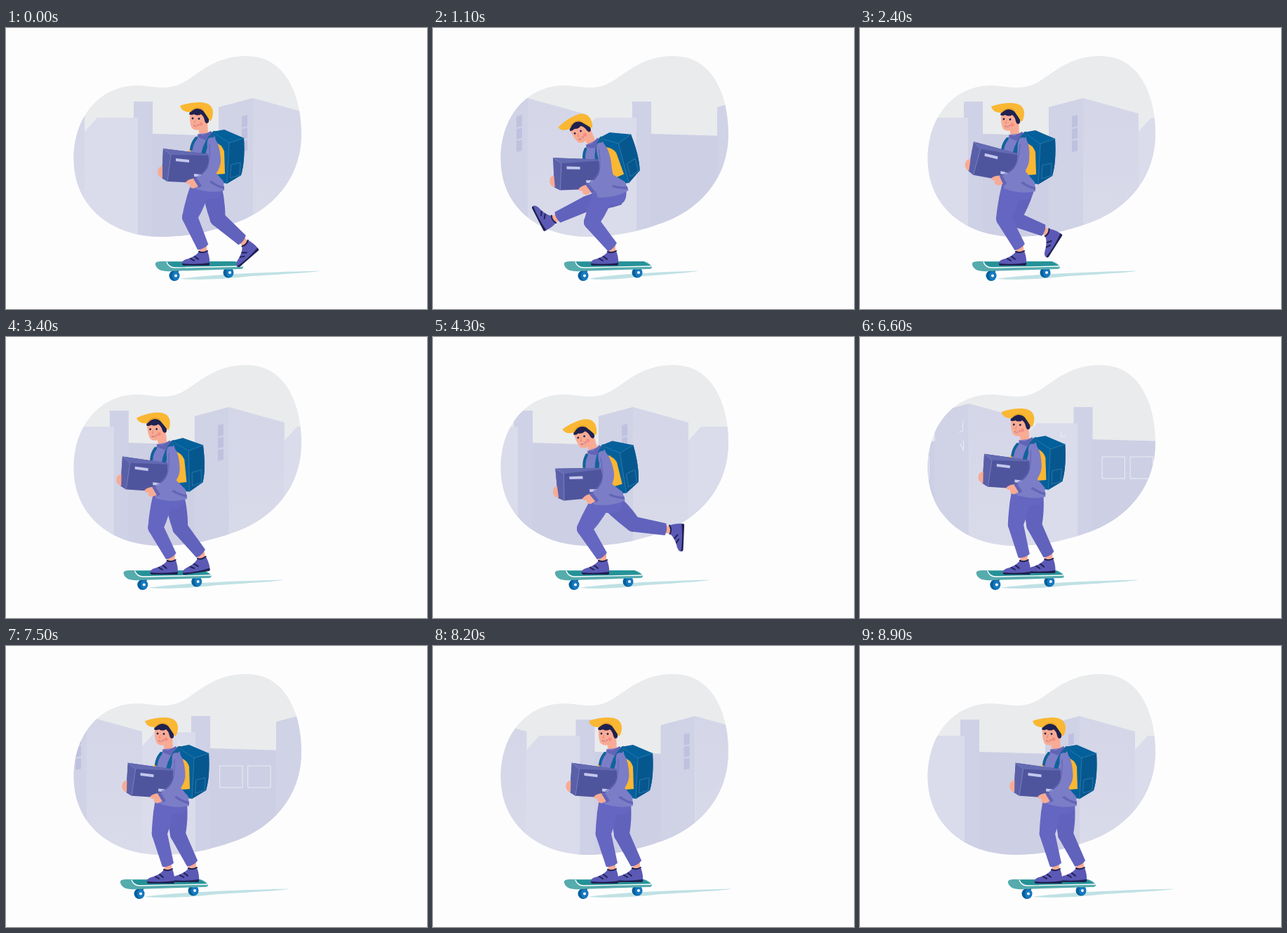
Animation, 600 px wide and 401 px high, one loop 9000 ms. Source, as an HTML page without scripts:

```html
<!DOCTYPE html>
<html lang="en">
<head>
<meta charset="utf-8">
<title>Skating courier</title>
<style>
html, body { margin: 0; width: 100%; height: 100%; overflow: hidden; background: #fefdfe; }
svg { display: block; width: 600px; height: 401px; animation: ride 9s infinite; }

/* scroll, board, shadow, hips, torso, arms, front leg, back leg */
@property --scroll { syntax: "<length>"; inherits: true; initial-value: 0px; }
@property --board { syntax: "<length>"; inherits: true; initial-value: 0px; }
@property --shade { syntax: "<number>"; inherits: true; initial-value: 1; }
@property --hx { syntax: "<length>"; inherits: true; initial-value: 0px; }
@property --hy { syntax: "<length>"; inherits: true; initial-value: 0px; }
@property --lean { syntax: "<angle>"; inherits: true; initial-value: 0deg; }
@property --arms { syntax: "<angle>"; inherits: true; initial-value: 0deg; }
@property --f1 { syntax: "<angle>"; inherits: true; initial-value: 0deg; }
@property --f2 { syntax: "<angle>"; inherits: true; initial-value: 0deg; }
@property --b1 { syntax: "<angle>"; inherits: true; initial-value: 0deg; }
@property --b2 { syntax: "<angle>"; inherits: true; initial-value: 0deg; }
@property --b3 { syntax: "<angle>"; inherits: true; initial-value: 0deg; }

@keyframes ride {
  0% { animation-timing-function: steps(11);
    --scroll: 0px; --board: 0px; --shade: 1; --hx: 0px; --hy: 0px; --lean: 0deg; --arms: 0deg;
    --f1: 18deg; --f2: -41.7deg; --b1: -11.8deg; --b2: -37.1deg; --b3: 8deg; }
  12.222% { animation-timing-function: steps(6);
    --scroll: 421px; --board: -26px; --shade: .78; --hx: -33px; --hy: 8px; --lean: -18deg; --arms: 13deg;
    --f1: 22.4deg; --f2: -62deg; --b1: 74deg; --b2: -9deg; --b3: -2deg; }
  18.888% { animation-timing-function: steps(3);
    --scroll: 653px; --board: -38px; --shade: .88; --hx: -44px; --hy: 16px; --lean: -14deg; --arms: 10deg;
    --f1: 34.7deg; --f2: -80.9deg; --b1: 5deg; --b2: -5deg; --b3: -20deg; }
  22.222% { animation-timing-function: steps(4);
    --scroll: 769px; --board: -45px; --shade: .93; --hx: -54px; --hy: 8px; --lean: -8deg; --arms: 9deg;
    --f1: 22.4deg; --f2: -62deg; --b1: -30deg; --b2: -8deg; --b3: -5deg; }
  26.666% { animation-timing-function: steps(9);
    --scroll: 923px; --board: -53px; --shade: 1; --hx: -61px; --hy: 1px; --lean: 0deg; --arms: 8deg;
    --f1: 12.4deg; --f2: -41.7deg; --b1: 19deg; --b2: -87.5deg; --b3: 11deg; }
  36.666% { animation-timing-function: steps(10);
    --scroll: 1210px; --board: -46px; --shade: .97; --hx: -55px; --hy: 0px; --lean: -3deg; --arms: 5deg;
    --f1: 9.4deg; --f2: -37deg; --b1: -8deg; --b2: -26.5deg; --b3: 34.5deg; }
  47.777% { animation-timing-function: steps(7);
    --scroll: 1528px; --board: -39px; --shade: .93; --hx: -38px; --hy: 7px; --lean: -12deg; --arms: 4deg;
    --f1: 30deg; --f2: -62.4deg; --b1: -46.5deg; --b2: -34deg; --b3: -7deg; }
  55.555% { animation-timing-function: steps(6);
    --scroll: 1807px; --board: -42px; --shade: .925; --hx: -42px; --hy: 0px; --lean: -3deg; --arms: 2deg;
    --f1: 18deg; --f2: -41.7deg; --b1: 5deg; --b2: -40.5deg; --b3: 35.5deg; }
  62.222% { animation-timing-function: steps(19);
    --scroll: 2046px; --board: -44px; --shade: .925; --hx: -43px; --hy: -4px; --lean: 0deg; --arms: 1deg;
    --f1: 9.3deg; --f2: -23.8deg; --b1: -2.7deg; --b2: -23.8deg; --b3: 26.5deg; }
  83.333% { animation-timing-function: steps(14);
    --scroll: 2634px; --board: -50px; --shade: 1.03; --hx: -50px; --hy: -4px; --lean: 0deg; --arms: 1deg;
    --f1: 8.6deg; --f2: -23.8deg; --b1: -2.7deg; --b2: -23.8deg; --b3: 26.5deg; }
  98.888% { animation-timing-function: steps(1);
    --scroll: 3151px; --board: -2px; --shade: 1.01; --hx: -2px; --hy: -4px; --lean: 0deg; --arms: 1deg;
    --f1: 8.6deg; --f2: -23.8deg; --b1: -2.7deg; --b2: -23.8deg; --b3: 26.5deg; }
  100% {
    --scroll: 3190px; --board: 0px; --shade: 1; --hx: 0px; --hy: 0px; --lean: 0deg; --arms: 0deg;
    --f1: 18deg; --f2: -41.7deg; --b1: -11.8deg; --b2: -37.1deg; --b3: 8deg; }
}

.city { transform: translateX(var(--scroll)); }
.ride { transform: translateX(var(--board)); }
.shade { transform: scaleX(var(--shade)); transform-origin: 247px 350px; }
.hips { transform: translate(var(--hx), var(--hy)); }
.torso { transform: rotate(var(--lean)); transform-origin: 285px 226px; }
.head { transform: rotate(calc(var(--lean) * .4)); transform-origin: 281px 150px; }
.arms { transform: rotate(var(--arms)); transform-origin: 300px 160px; }
.f1 { transform: rotate(var(--f1)); }
.f2 { transform: rotate(var(--f2)); }
.b1 { transform: rotate(var(--b1)); }
.b2 { transform: rotate(var(--b2)); }
.b3 { transform: rotate(var(--b3)); }

.skin { fill: #f8ab94; }
.dark { fill: #20214f; }
.coat { fill: #7b7dc7; }
.coat2 { fill: #6264b6; }
.blue { fill: #04609b; }
.sun { fill: #fab733; }
.line { fill: none; stroke-linecap: round; stroke-linejoin: round; }
</style>
</head>
<body>
<svg viewBox="0 0 600 401">
<defs>
  <path id="blob" d="M96.500 187C96.500 125 135 82 187 82C205 82 215 87 235 84C267 79 285 40 343 40C398 40 421 95 421 151C421 215 380 258 330 277C295 290 260 298 222 298C150 298 96.500 255 96.500 187Z"/>
  <clipPath id="view"><use href="#blob"/></clipPath>
  <linearGradient id="face" x2="0" y2="1">
    <stop stop-color="#d4d6e8"/><stop offset="1" stop-color="#d9dbea"/>
  </linearGradient>

  <!-- x = 0 is the corner of the tall house -->
  <g id="houses">
    <path fill="#cdcfe4" d="M-166 310V151H-143L-40 154V310Z"/>
    <path fill="#cfd1e6" d="M-170 310V105H-143V310Z"/>
    <path fill="#dadceb" d="M-240 310V148L-222 128H-164V310Z"/>
    <path fill="#d0d2e6" d="M-49 310V113L0 100V310Z"/>
    <path fill="url(#face)" d="M0 310V100L79 122V310Z"/>
  </g>
  <g id="day">
    <use href="#houses"/>
    <path fill="#bfc1df" d="M-16 126L-8 124V140L-16 142ZM-16 144L-8 142V157L-16 159ZM-16 161L-8 160V175L-16 177Z"/>
  </g>
  <g id="shop">
    <use href="#houses" y="-5"/>
    <path class="line" stroke="#ecedf5" d="M-129 171H-97V202H-129ZM-89 171H-57V202H-89ZM-188 136V142H-181M-9 120V134L-14 136M-8 148V162L-13 152"/>
  </g>

  <!-- origin is the ankle -->
  <g id="shoe">
    <path class="skin" d="M-5 -4H5V12H-6Z"/>
    <path fill="#5b59b5" d="M-6 6C-9 11 -17 15 -24 17C-30 19 -31 22 -30 25H9C10 18 8 10 6 5Q0 9 -6 6Z"/>
    <path class="dark" d="M-30 23Q-10 25 9 22V25Q9 26 7 26H-28Q-30 26 -30 23Z"/>
    <path class="line" stroke="#20214f" stroke-width="2" d="M-6 6Q0 9 6 5M-12 13L-7 17M-18 16L-13 19"/>
  </g>
  <path id="thigh" d="M-13 -5Q0 -11 15 -5Q16 20 11 42A11 11 0 0 1 -11 42Q-14 18 -13 -5Z"/>
  <path id="shin" d="M-11 0A11 11 0 0 1 11 0L8.500 46Q0 50 -8.500 47Z"/>
  <g id="wheel">
    <circle class="blue" r="7.5"/>
    <ellipse cx="2" rx="5" ry="6.6" fill="#1779c0"/>
    <circle cx="2" r="2" fill="#fff"/>
  </g>
</defs>

<use href="#blob" fill="#e9ebed"/>
<g clip-path="url(#view)">
  <g class="city">
    <use href="#day" x="352"/>
    <use href="#day" x="33"/>
    <use href="#day" x="-286"/>
    <use href="#day" x="-605"/>
    <use href="#day" x="-924"/>
    <use href="#day" x="-1243"/>
    <use href="#shop" x="-1881"/>
    <use href="#shop" x="-2200"/>
    <use href="#day" x="-1562"/>
    <use href="#day" x="-2519"/>
    <use href="#day" x="-2838"/>
    <use href="#day" x="-3157"/>
  </g>
</g>

<g class="ride">
  <path class="shade" fill="#c0e1e4" d="M247 358Q300 350 448 346.500Q440 349 350 354Q290 361 247 358Z"/>
  <path fill="#17466f" d="M234 344H248L244 350H238ZM310 341H323L319 347H313Z"/>
  <use href="#wheel" x="240" y="353.500"/>
  <use href="#wheel" x="317" y="349"/>
  <path fill="#56abad" d="M213 338C212 334 216 333 222 333H325C331 333 338 339 338 341C338 344 335 344 331 344L236 347C222 348 215 345 213 338Z"/>
  <path fill="#259298" d="M230 334L326 333L337 340L240 342Q233 340 230 334Z"/>
  <path class="line" stroke="#fff" stroke-width="1.300" d="M229 334Q232 342 241 342L337 340"/>
</g>

<g class="hips">
  <g transform="translate(293 231)">
    <g class="b1" fill="#6062bc">
      <g transform="translate(0 42)"><g class="b2">
        <g transform="translate(0 47)"><g class="b3"><use href="#shoe"/></g></g>
        <use href="#shin"/>
      </g></g>
      <use href="#thigh"/>
    </g>
  </g>
</g>

<g class="ride"><use href="#shoe" x="281" y="313"/></g>

<g class="hips">
  <g transform="translate(275 230)">
    <g class="f1" fill="#6566c1">
      <g transform="translate(0 42)"><g class="f2"><use href="#shin"/></g></g>
      <use href="#thigh"/>
    </g>
  </g>
  <path fill="#6566c1" d="M263 220H308Q311 241 298 244H272Q264 238 263 220Z"/>

  <g class="torso">
    <path class="blue" d="M294 148L311 145L339 157Q341 190 335 210L315 222L290 218Z"/>
    <path fill="#07578f" d="M318 164L339 157Q341 190 335 210L315 222Z"/>
    <path class="line" stroke="#2f7fb1" stroke-width=".8" d="M297 150L318 164L339 157M318 164L315 222M321 195L334 192L333 210L320 214Z"/>
    <path class="sun" d="M296 162Q308 166 311 176L312 208L288 210Z"/>

    <path class="sun" d="M264 168L260 176L266 180Z"/>
    <path class="skin" d="M274 138L287 134L288 151L281 156L275 150Z"/>
    <path class="coat" d="M276 151L295 149C302 160 300 182 297 204L310 219L311 232Q290 237 266 228C268 205 261 182 264 168Q269 157 276 151Z"/>
    <path class="coat2" d="M273 151L281 153L292 147L295 151L284 160L274 156ZM293 218Q302 225 311 226V230Q299 227 290 220Z"/>
    <path class="line" stroke="#11639a" stroke-width="6" stroke-linecap="butt" d="M297 150Q285 161 281 180"/>
    <path class="line" stroke="#11639a" stroke-width="4" d="M271 157Q265 164 264 173"/>

    <g class="head">
      <path class="skin" d="M262 119Q274 110 286 120Q287 136 281 142Q272 149 265 143Q261 136 262 119Z"/>
      <ellipse class="skin" cx="286" cy="133" rx="3" ry="4"/>
      <path class="dark" d="M261 123Q264 111 278 111Q286 114 290 122L289 134Q285 139 283 132Q282 126 278 123Q273 126 268 123Q264 125 261 123Z"/>
      <path class="sun" d="M248 111Q262 106 276 106Q294 106 295 120Q295 129 291 133Q286 125 281 118Q272 111 263 120Q250 120 248 111Z"/>
      <path class="line" stroke="#e99a23" d="M263 119Q270 110 281 116"/>
      <circle class="dark" cx="266" cy="129" r="1.400"/>
      <circle class="dark" cx="275" cy="129.500" r="1.400"/>
      <path class="line" stroke="#e07f70" stroke-width=".8" d="M270 131L268 135H270"/>
      <path fill="#fff" stroke="#c9525c" stroke-width=".7" d="M267 139Q271 140 275 138Q272 143 267 139Z"/>
      <circle cx="278" cy="137" r="2.500" fill="#f58c82"/>
    </g>

    <g class="arms">
      <path fill="#4f559d" d="M224 172L289 180L288 219L271 221L230 219L222 214Z"/>
      <path fill="#636ab2" d="M224 172L289 180V182L235 181Z"/>
      <path fill="#5a60a8" d="M224 172L235 181L230 219L222 214Z"/>
      <path class="line" stroke="#8287c4" stroke-width=".8" d="M224 172L235 181L230 219"/>
      <path fill="#c3c7ee" d="M242 186L261 188V192L242 190ZM268 208L278 209V213L268 212Z"/>
      <path class="skin" d="M223 197Q216 198 216 206Q217 213 223 214Z"/>
      <path class="skin" d="M272 214Q260 215 256 220Q257 223 262 223Q260 228 267 229L276 225Z"/>
      <path class="coat" d="M288 158C300 150 306 173 306 190C305 206 292 217 277 227L268 216C279 210 288 203 289 193C290 180 284 168 288 158Z"/>
      <path class="line" stroke="#6264b6" d="M290 166Q291 182 289 193Q286 203 273 212"/>
      <path class="coat2" d="M267 215L271 213L279 225L275 228Z"/>
    </g>
  </g>
</g>
</svg>
</body>
</html>
```
